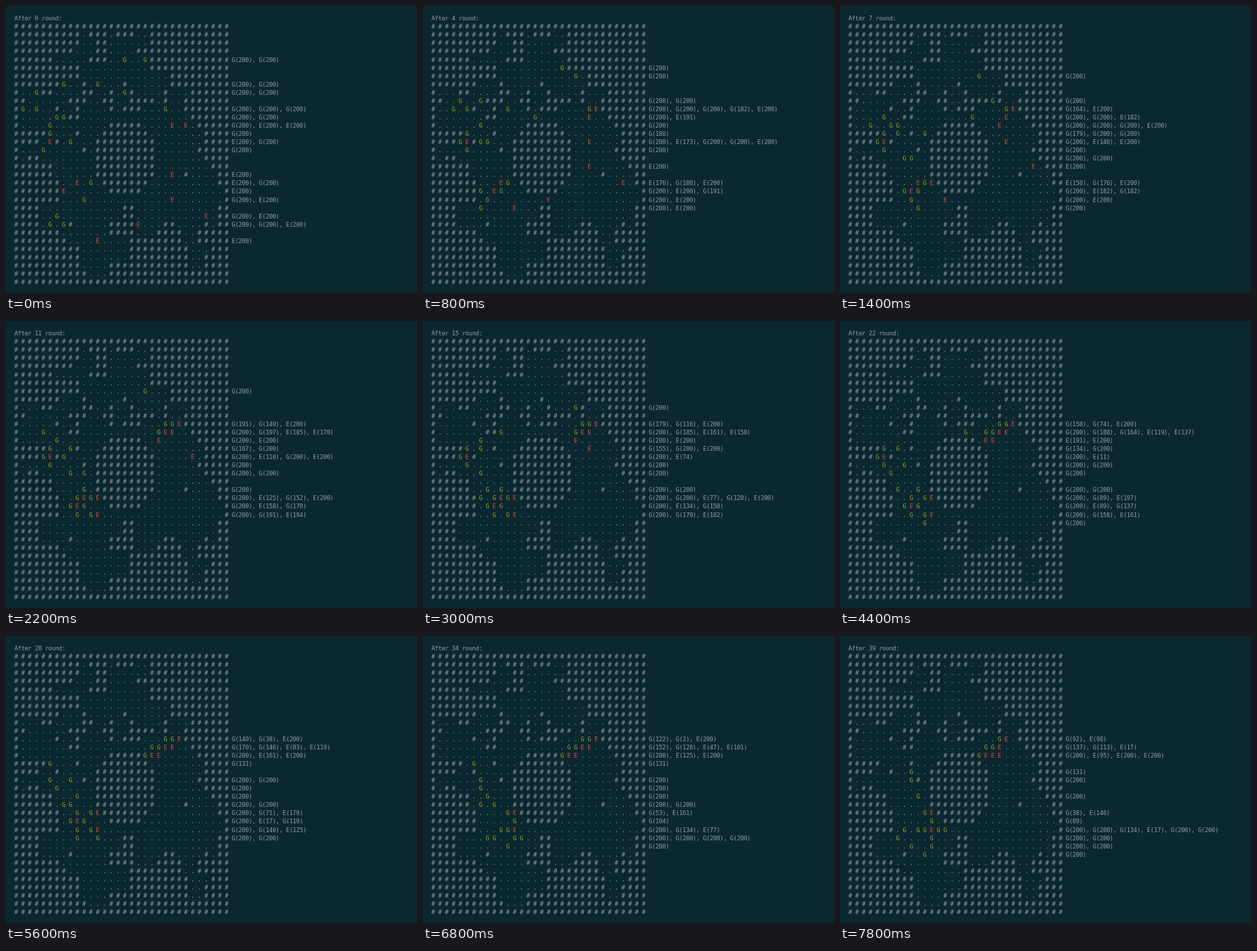
Recreate the animation shown at these times as an HTML page with a canvas. Size 600 by 420 pixels, loop 8 s.

```html
<!DOCTYPE html>
<html lang="en">
<head>
<meta charset="utf-8">
<title>Goblins and elves</title>
<style>
  html, body { margin: 0; width: 100%; height: 100%; overflow: hidden; background: #0b2831; }
  canvas { display: block; }
</style>
</head>
<body>
<canvas id="stage" width="600" height="420"></canvas>
<script>
const cave = `
################################
##########.###.###..############
##########..##......############
#########...##....##############
######.....###..G..G############
##########..........############
##########.............#########
#######G..#.G...#......#########
#..G##....##..#.G#....#...######
##......###..##..####.#..#######
#G.G..#..#....#.###...G..#######
#.....GG##................######
#....G........#####....E.E.#####
#####G...#...#######........####
####.E#.G...#########.......####
#...G.....#.#########......#####
#.##........#########.......####
######......#########........###
######......#########..E.#....##
#######..E.G.#######..........##
#######E......#####............#
#######...G............E.......#
####............##............##
####..G.........##..........E.##
####.G.G#.....####E...##....#.##
#######.......####...####..#####
########....E....########..#####
##########.......#########...###
##########.......#########..####
##########....############..####
###########...##################
################################`.trim().split('\n');

const SIZE = 32, ROUNDS = 40, ROUND_MS = 200, ATTACK = 3;
const STEPS = [-SIZE, -1, 1, SIZE]; // reading order

const grid = [...cave.join('')];
let units = grid.flatMap((type, pos) => 'GE'.includes(type) ? [{ type, pos, hp: 200 }] : []);

const neighbours = pos => STEPS.map(step => pos + step);

function distancesFrom(start) {
  const dist = new Array(grid.length).fill(Infinity);
  const queue = [start];
  dist[start] = 0;
  for (const pos of queue) {
    for (const next of neighbours(pos)) {
      if (grid[next] === '.' && dist[next] === Infinity) {
        dist[next] = dist[pos] + 1;
        queue.push(next);
      }
    }
  }
  return dist;
}

// Nearest cell; ties go to the first in reading order.
const nearest = (cells, dist) => cells
  .filter(pos => dist[pos] < Infinity)
  .sort((a, b) => dist[a] - dist[b] || a - b)[0];

function move(unit, enemies) {
  const inRange = enemies.flatMap(enemy => neighbours(enemy.pos));
  if (inRange.includes(unit.pos)) return;
  const goal = nearest(inRange, distancesFrom(unit.pos));
  if (goal === undefined) return;
  const next = nearest(neighbours(unit.pos), distancesFrom(goal));
  grid[unit.pos] = '.';
  grid[next] = unit.type;
  unit.pos = next;
}

function attack(unit, enemies) {
  const adjacent = neighbours(unit.pos);
  const victim = enemies
    .filter(enemy => adjacent.includes(enemy.pos))
    .sort((a, b) => a.hp - b.hp || a.pos - b.pos)[0];
  if (!victim) return;
  victim.hp -= ATTACK;
  if (victim.hp <= 0) grid[victim.pos] = '.';
}

const byPosition = (a, b) => a.pos - b.pos;

function playRound() {
  for (const unit of units) {
    if (unit.hp <= 0) continue;
    const enemies = units.filter(other => other.hp > 0 && other.type !== unit.type);
    move(unit, enemies);
    attack(unit, enemies);
  }
  units = units.filter(unit => unit.hp > 0).sort(byPosition);
}

function snapshot() {
  return Array.from({ length: SIZE }, (_, row) => ({
    cells: grid.slice(row * SIZE, (row + 1) * SIZE).join(' '),
    status: units
      .filter(unit => Math.floor(unit.pos / SIZE) === row)
      .map(unit => `${unit.type}(${unit.hp})`)
      .join(', ')
  }));
}

const history = [];
while (history.length < ROUNDS) {
  history.push(snapshot());
  playRound();
}

const LEFT = 12.3, BASELINE = 21.2, CHAR_WIDTH = 4.955, LINE_HEIGHT = 12.06;
const TEXT = '#949d9e';
const UNIT_COLORS = { G: '#a5a414', E: '#ee443c' };
const ctx = document.getElementById('stage').getContext('2d');

// Characters sit on a terminal grid.
function write(text, column, line, colors = {}) {
  [...text].forEach((char, i) => {
    if (char === ' ') return;
    ctx.fillStyle = colors[char] || TEXT;
    ctx.fillText(char, LEFT + (column + i) * CHAR_WIDTH, BASELINE + line * LINE_HEIGHT);
  });
}

function draw(round) {
  ctx.fillStyle = '#0b2831';
  ctx.fillRect(0, 0, 600, 420);
  ctx.font = '8.8px "DejaVu Sans Mono", monospace';
  write(`After ${round} round:`, 0, 0);
  history[round].forEach(({ cells, status }, row) => {
    write(cells, 0, row + 1, UNIT_COLORS);
    write(status, SIZE * 2, row + 1);
  });
}

const start = performance.now();
let shown = -1;

function tick() {
  const round = Math.floor((performance.now() - start) / ROUND_MS) % ROUNDS;
  if (round !== shown) draw(shown = round);
  requestAnimationFrame(tick);
}
tick();
</script>
</body>
</html>
```
